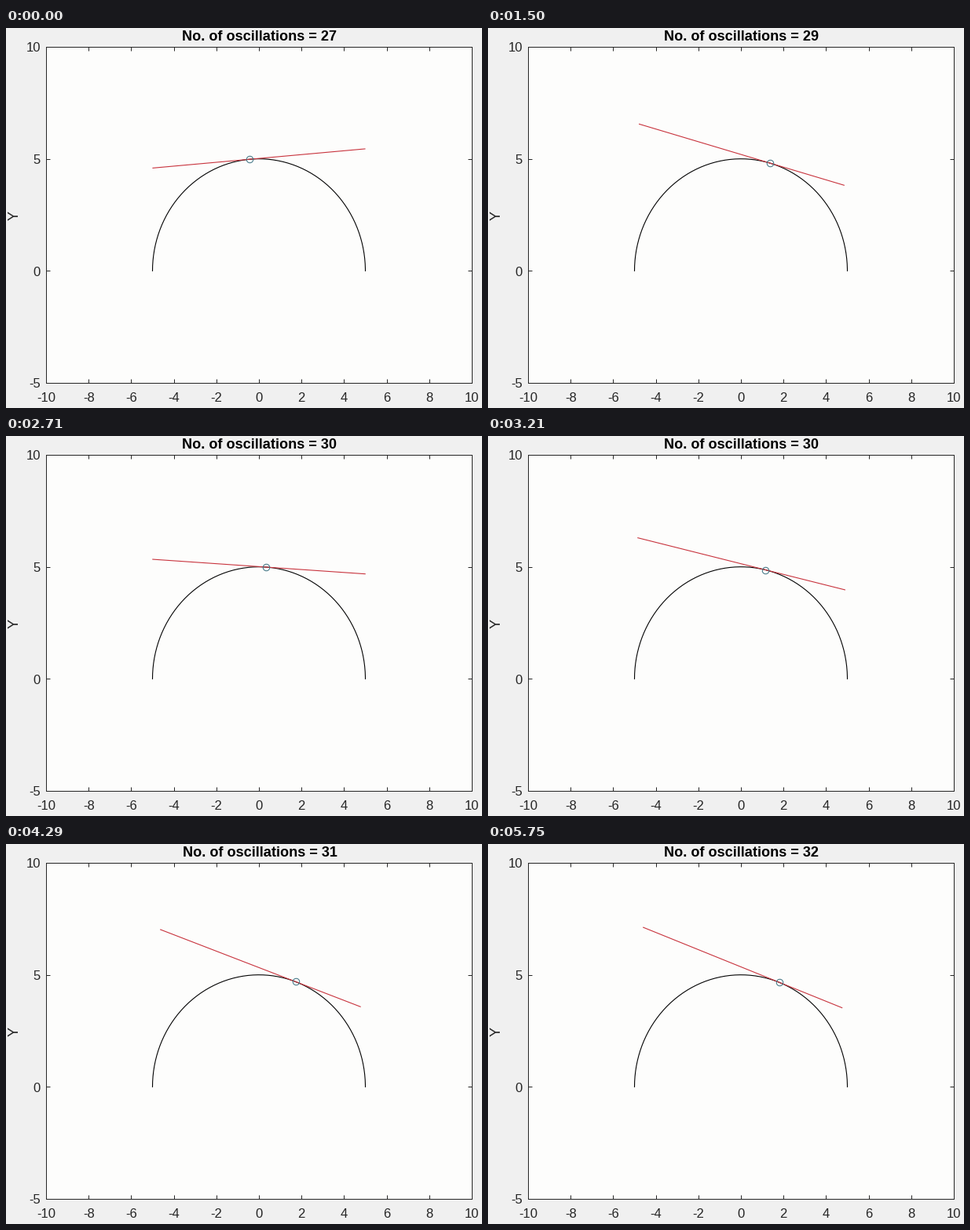
Animation of 606x484 px, one loop 5790 ms. Source, as a matplotlib script:

```python
import numpy as np
import matplotlib.pyplot as plt
from matplotlib.animation import FuncAnimation

W, H, DPI = 606, 484, 100
FRAMES, LOOP = 139, 5790
R, HALF = 5, 5          # cylinder radius, half plank length
SWING = 0.4             # largest tilt in radians
INK = "#262626"
PX = 72 / DPI           # one pixel in points

plt.rcParams["font.family"] = "Liberation Sans"

fig = plt.figure(figsize=(W / DPI, H / DPI), dpi=DPI, facecolor="#f0f0f0")
left, right, top, bottom = 51, 593, 24, 452
ax = fig.add_axes([left / W, 1 - bottom / H, (right - left) / W, (bottom - top) / H],
                  facecolor="#fdfdfc")
ax.set(xlim=(-10, 10), ylim=(-5, 10),
       xticks=range(-10, 11, 2), yticks=range(-5, 11, 5))
ax.tick_params(direction="in", top=True, right=True, length=5.4 * PX, width=PX,
               color=INK, labelbottom=False, labelleft=False)
for spine in ax.spines.values():
    spine.set(linewidth=PX, color=INK)


def label(x, y, text, size=16.67, color=INK, ha="center", **kw):
    """Text with its baseline at pixel (x, y), measured from the top left."""
    return fig.text(x / W, 1 - y / H, text, fontsize=size * PX, color=color,
                    ha=ha, va="baseline", **kw)


for v in range(-10, 11, 2):
    label(left + (v + 10) / 20 * (right - left), 476, str(v))
for v in range(-5, 11, 5):
    label(44, bottom - (v + 5) / 15 * (bottom - top) + 6.5, str(v), ha="right")
label(16, 239, "Y", 18.33, rotation=90, rotation_mode="anchor")
title = label(323, 16, "", 18.15, "black", weight="bold")

arc = np.linspace(-np.pi / 2, np.pi / 2, 200)
ax.plot(R * np.sin(arc), R * np.cos(arc), color="black", lw=1.1 * PX)
plank, = ax.plot([], [], color="#c8323c", lw=1.1 * PX)
contact, = ax.plot([], [], "o", ms=8.5 * PX, mfc="none", mec="#3a7080", mew=PX)

# Steady swing in cycles, with two short stalls and a catch-up.
STEPS = [0, 20, 52, 77, 84, 85, 102, 103, 123, 138]
CYCLES = [0.969, 1.62, 2.607, 3.408, 3.63, 3.63, 4.164, 4.164, 4.861, 5.321]


def tilt(cycles):
    """Rocking angle: slower near the ends of the swing than a sine."""
    phase = 2 * np.pi * cycles
    u = phase
    for _ in range(8):
        u = phase + 0.05 * np.sin(2 * u)
    return SWING * np.sin(u)


def update(i):
    cycles = np.interp(i, STEPS, CYCLES)
    a = tilt(cycles)
    s, c = np.sin(a), np.cos(a)
    # Rolling without slipping moves the plank centre back by R * a.
    ends = np.array([-HALF, HALF]) - R * a
    plank.set_data(R * s + ends * c, R * c - ends * s)
    contact.set_data([R * s], [R * c])
    title.set_text(f"No. of oscillations = {27 + int(cycles)}")
    return plank, contact, title


anim = FuncAnimation(fig, update, frames=FRAMES, interval=LOOP / FRAMES,
                     repeat=True, repeat_delay=0)
plt.show()
```
